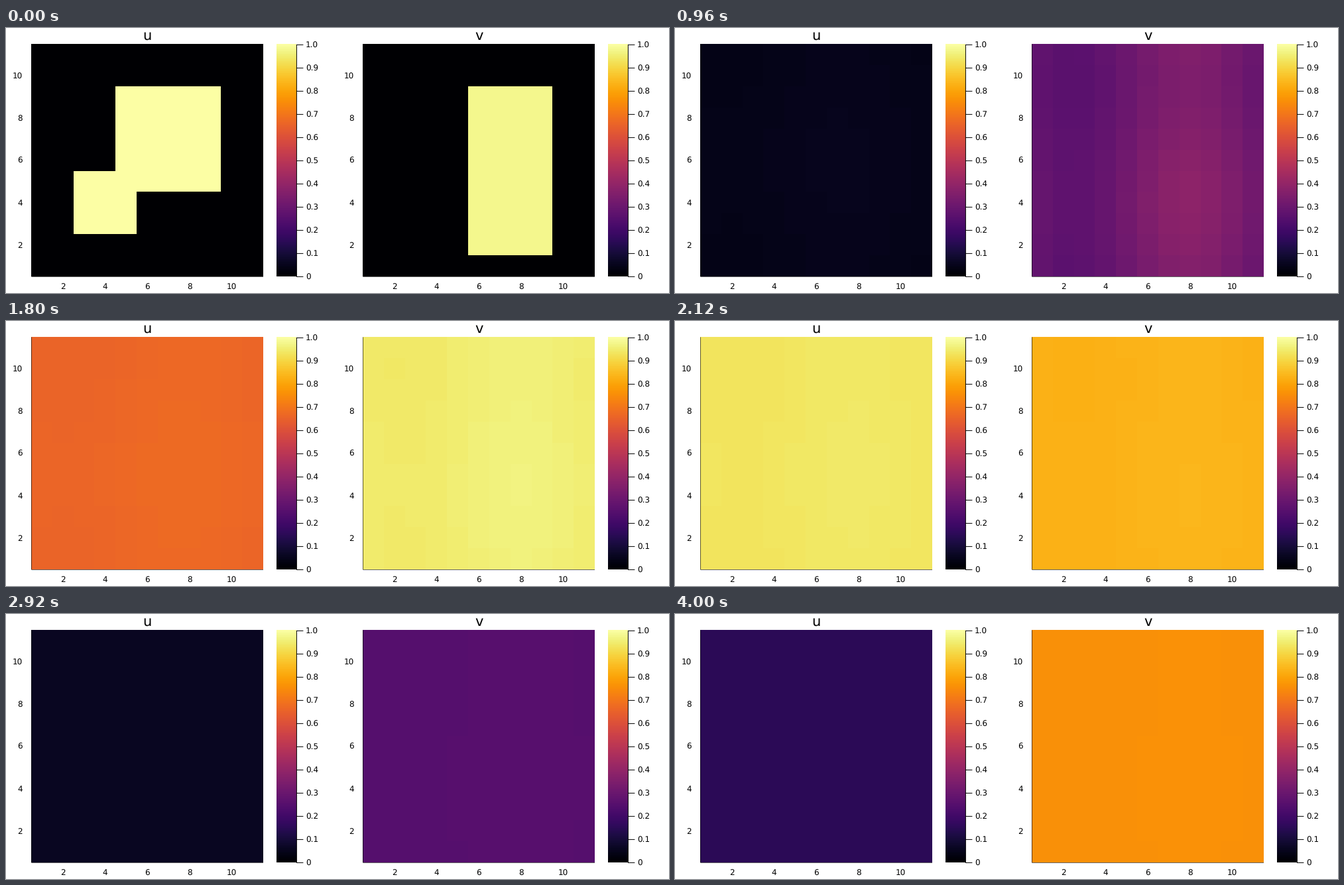
A matplotlib script for the animation above (4040 ms loop, 1000 by 400 pixels).

```python
import numpy as np
import matplotlib.pyplot as plt
from matplotlib.animation import FuncAnimation

WIDTH, HEIGHT, DPI = 1000, 400, 100
FRAMES, INTERVAL = 101, 40
N = 11
DIFFUSION = 6.2
PX = 72 / DPI

plt.rcParams["font.family"] = "DejaVu Sans"
plt.rcParams["text.hinting"] = "none"


def sigmoid(x):
    return 1 / (1 + np.exp(-x))


def pulses(ms, floor, height, rise, rise_width, fall, fall_width, period):
    """Repeating pulse with a soft rise and a soft fall."""
    level = floor
    for start in (0, period):
        t = ms - start
        level += height * (sigmoid((t - rise) / rise_width)
                           - sigmoid((t - fall) / fall_width))
    return level


def u_mean(ms):
    first_drop = (u_start.mean() - .03) * np.exp(-ms / 230)
    return first_drop + pulses(ms, .03, 1.1, 1742, 176, 2452, 132, 2625)


def v_mean(ms):
    return pulses(ms, .24, .735, 1233, 126, 2317, 140, 2657)


def block_field(*blocks):
    """Grid of zeros with ones in blocks of (row, column, rows, columns)."""
    field = np.zeros((N, N))
    for row, col, rows, cols in blocks:
        field[row:row + rows, col:col + cols] = 1
    return field


u_start = block_field((4, 4, 5, 5), (2, 2, 3, 3))
v_start = block_field((1, 5, 8, 4))

wave = 2 - 2 * np.cos(2 * np.pi * np.arange(N) / N)
decay = wave[:, None] + wave[None, :]


def diffuse(field, seconds):
    """Heat flow of the deviation from the mean on a periodic grid."""
    spectrum = np.fft.fft2(field - field.mean())
    return np.fft.ifft2(spectrum * np.exp(-DIFFUSION * seconds * decay)).real


def fields(ms):
    s = ms / 1000
    u_dev, v_dev = diffuse(u_start, s), diffuse(v_start, s)
    reaction = 1 - np.exp(-6 * s)
    v_dev = v_dev - .45 * reaction * u_dev
    u_dev = u_dev / u_start.mean() * np.exp(-1.5 * s) + reaction * v_dev
    return (np.clip(u_mean(ms) * (1 + u_dev), 0, 1),
            np.clip(v_mean(ms) + v_dev, 0, 1))


fig = plt.figure(figsize=(WIDTH / DPI, HEIGHT / DPI), dpi=DPI, facecolor="white")
ax = fig.add_axes([0, 0, 1, 1])
ax.axis("off")

LEFT, TOP, BOTTOM, SIDE = 38.4, 24.4, 375.2, 349.6
CELL_W, CELL_H = SIDE / N, (BOTTOM - TOP) / N


def label(x, y, text, size=12, ha="center"):
    ax.text(x, y, text, fontsize=size * PX, ha=ha, va="baseline", color="black")


def line(xs, ys, width=1):
    ax.plot(xs, ys, color="black", lw=width * PX, solid_capstyle="butt", snap=False)


def picture(data, left, right):
    return ax.imshow(data, extent=(left, right, BOTTOM, TOP), origin="lower",
                     cmap="inferno", vmin=0, vmax=1, interpolation="nearest",
                     aspect="auto")


def panel(x0, title, data):
    left = x0 + LEFT
    image = picture(data, left, left + SIDE)
    line([left, left], [TOP, BOTTOM], .6)
    line([left, left + SIDE], [BOTTOM + .2] * 2, .6)
    label(x0 + 213.3, 18.5, title, 21)
    for n in range(2, N, 2):
        label(left + (n - .5) * CELL_W, 394.4, str(n))
        label(x0 + 24.6, BOTTOM - (n - .5) * CELL_H + 4.4, str(n), ha="right")

    picture(np.linspace(0, 1, 256)[:, None], x0 + 408, x0 + 438)
    line([x0 + 438.4] * 2, [25, 375.8])
    for n in range(11):
        y = 375.4 - 35 * n
        line([x0 + 438, x0 + 448.4], [y, y])
        label(x0 + 452, y + 4, f"{n / 10:.1f}" if n else "0", ha="left")
    return image


images = [panel(0, "u", u_start), panel(500, "v", v_start)]
ax.set_xlim(0, WIDTH)
ax.set_ylim(HEIGHT, 0)


def update(frame):
    for image, data in zip(images, fields(frame * INTERVAL)):
        image.set_data(data)
    return images


anim = FuncAnimation(fig, update, frames=FRAMES, interval=INTERVAL,
                     init_func=lambda: update(0), repeat=True, repeat_delay=0)
plt.show()
```
